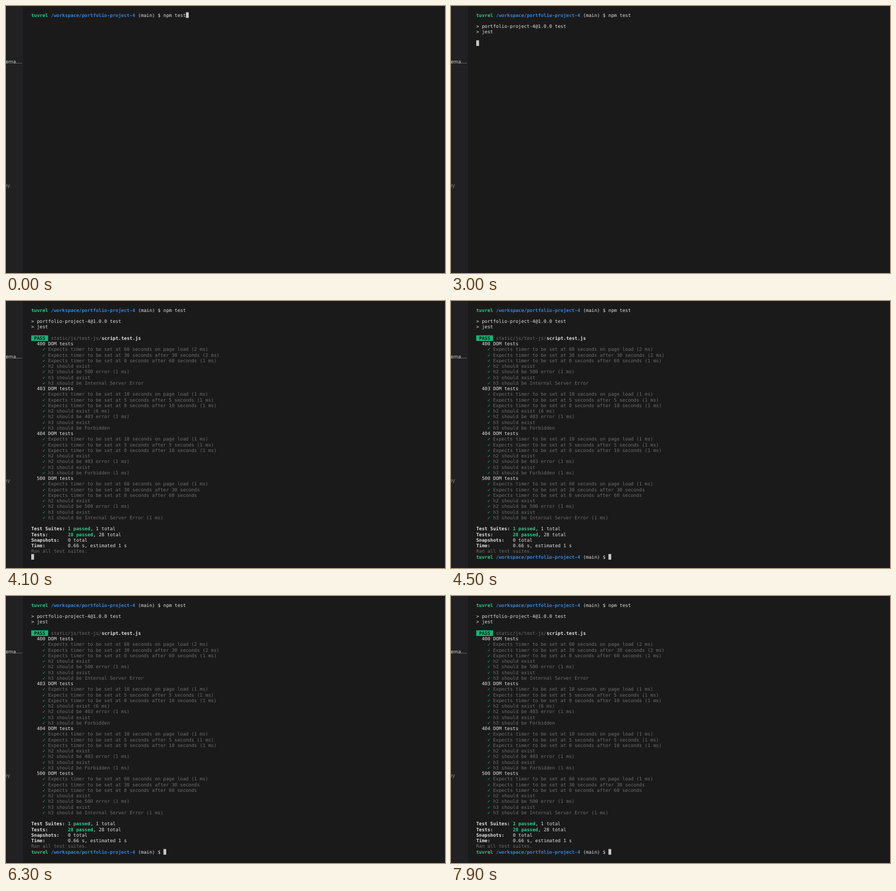
An HTML page for the animation above (8 s loop, 800 by 488 pixels).

```html
<!DOCTYPE html>
<html lang="en">
<head>
<meta charset="utf-8">
<title>Terminal test run</title>
<style>
  html, body { margin: 0; width: 100%; height: 100%; overflow: hidden; background: #1b1a1b; }
  svg { display: block; }
  text {
    font: 8.513px "DejaVu Sans Mono", monospace;
    text-rendering: geometricPrecision;
    white-space: pre;
    fill: #e2e2e2;
  }
  .side { font: 9.4px Inter, sans-serif; text-anchor: end; fill: #c8c8c8; }
  .faint { fill: #858585; }
  .bold, .user, .path, .ok, .badge { font-weight: bold; }
  .user, .ok { fill: #23d18b; }
  .path { fill: #3387dc; }
  .dim { fill: #6e6e6e; }
  .tick { fill: #12bd7a; }
  .badge { fill: #151515; }
</style>
</head>
<body>
<svg id="stage" width="800" height="488" viewBox="0 0 800 488">
  <rect width="800" height="488" fill="#1b1a1b"/>
  <rect width="31" height="488" fill="#212022"/>
  <text class="side" x="29" y="105.3">ema.…</text>
  <text class="side faint" x="7.6" y="330.8">py</text>
</svg>
<script>
const NS = 'http://www.w3.org/2000/svg';
const LOOP = 8000, LEFT = 46, TOP = 11.5, CW = 5.125, CH = 10.25, BASE = 8.1;
const stage = document.getElementById('stage');

function add(parent, tag, attrs, content) {
  const el = document.createElementNS(NS, tag);
  for (const k in attrs) el.setAttribute(k, attrs[k]);
  if (content) el.textContent = content;
  return parent.appendChild(el);
}
const colX = c => LEFT + c * CW;
const rowY = r => TOP + r * CH;

function put(group, row, col, str, cls = '') {
  add(group, 'text', { x: colX(col), y: rowY(row) + BASE, class: cls }, str);
}

// Each layer is visible from start to end (ms).
const layers = [];
function layer(start, end = LOOP) {
  const el = add(stage, 'g', {});
  layers.push({ el, start, end });
  return el;
}

function prompt(group, row, command = '') {
  put(group, row, 0, 'tuvrel', 'user');
  put(group, row, 7, '/workspace/portfolio-project-4', 'path');
  put(group, row, 38, '(main) $ ' + command);
}

function status(group, row, label, color) {
  add(group, 'rect', { x: LEFT, y: rowY(row), width: 6 * CW, height: CH, fill: color });
  put(group, row, 1, label, 'badge');
  put(group, row, 7, 'static/js/test-js/', 'dim');
  put(group, row, 25, 'script.test.js', 'bold');
}

prompt(layer(0), 0, 'npm test');

const script = layer(3000);
put(script, 2, 0, '> portfolio-project-4@1.0.0 test');
put(script, 3, 0, '> jest');

status(layer(3400, 4100), 6, 'RUNS', '#dfdd18');

const report = layer(4100);
status(report, 5, 'PASS', '#0fb675');

// page, three timer results, four heading results
const timer = s => 'Expects timer to be set at ' + s;
const slow = [timer('60 seconds on page load'), timer('30 seconds after 30 seconds'), timer('0 seconds after 60 seconds')];
const quick = [timer('10 seconds on page load'), timer('5 seconds after 5 seconds'), timer('0 seconds after 10 seconds')];
const headings = (code, name) =>
  ['h2 should exist', `h2 should be ${code} error`, 'h3 should exist', `h3 should be ${name}`];
const suites = [
  [400, slow, headings(500, 'Internal Server Error'), '2210100'],
  [403, quick, headings(403, 'Forbidden'), '1116100'],
  [404, quick, headings(403, 'Forbidden'), '1110101'],
  [500, slow, headings(500, 'Internal Server Error'), '1000101']
];
let row = 6;
for (const [page, timers, heads, ms] of suites) {
  put(report, row++, 2, page + ' DOM tests');
  [...timers, ...heads].forEach((name, i) => {
    put(report, row, 4, '✓', 'tick');
    put(report, row++, 6, name + (+ms[i] ? ` (${ms[i]} ms)` : ''), 'dim');
  });
}

const summary = [
  ['Test Suites:', '1 passed', ', 1 total'],
  ['Tests:', '28 passed', ', 28 total'],
  ['Snapshots:', '', '0 total'],
  ['Time:', '', '0.66 s, estimated 1 s']
];
summary.forEach(([label, passed, rest], i) => {
  put(report, 39 + i, 0, label, 'bold');
  if (passed) put(report, 39 + i, 13, passed, 'ok');
  put(report, 39 + i, 13 + passed.length, rest);
});
put(report, 43, 0, 'Ran all test suites.', 'dim');

prompt(layer(4300), 44);

// time, column, row
const moves = [[0, 55, 0], [2600, 0, 1], [3000, 0, 5], [3400, 0, 7], [4100, 0, 44], [4300, 47, 44]];
const cursor = add(stage, 'rect', { width: CW, height: CH, fill: '#c6c6c6' });

function draw(t) {
  for (const { el, start, end } of layers)
    el.setAttribute('visibility', t >= start && t < end ? 'visible' : 'hidden');
  const [, col, line] = moves.filter(m => m[0] <= t).pop();
  cursor.setAttribute('x', colX(col));
  cursor.setAttribute('y', rowY(line));
}

const begin = performance.now();
function tick() {
  draw((performance.now() - begin) % LOOP);
  requestAnimationFrame(tick);
}
draw(0);
requestAnimationFrame(tick);
</script>
</body>
</html>
```
